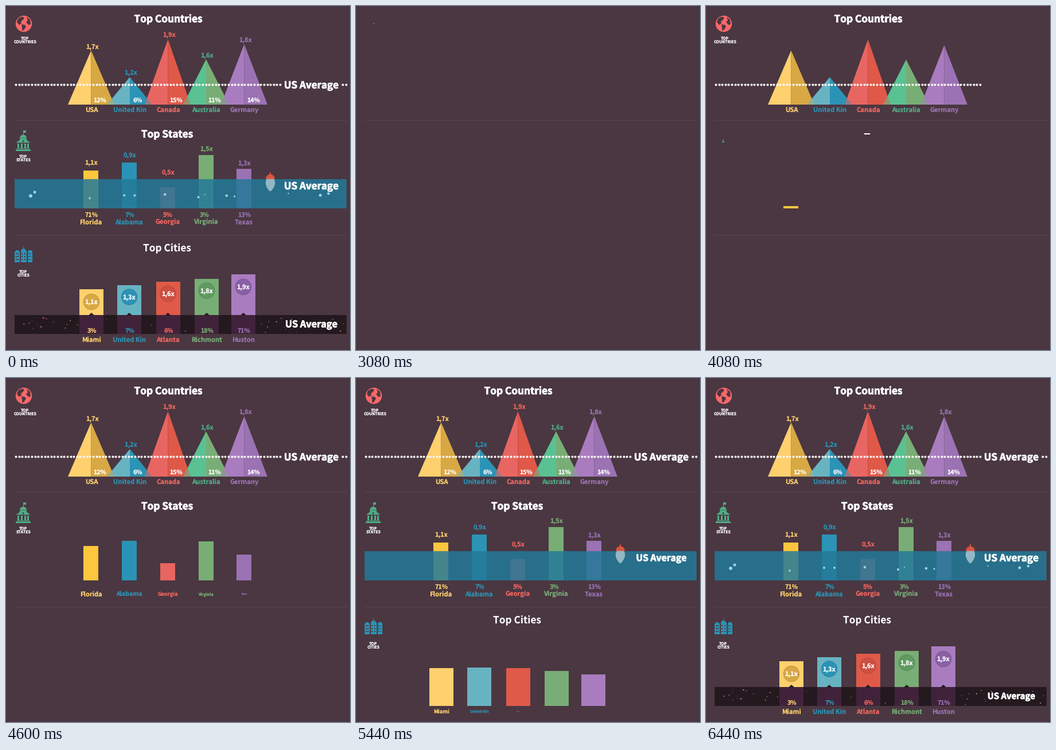
These frames come from a looping animation (600 px wide and 600 px high, 6480 ms). A matplotlib script:

```python
import numpy as np
import matplotlib.pyplot as plt
from matplotlib.animation import FuncAnimation
from matplotlib.patches import Circle, Polygon, Rectangle, Wedge
from matplotlib.patheffects import withStroke
from matplotlib.transforms import Affine2D

STEP, FRAMES = 40, 162
END = STEP * FRAMES
FADE_STEPS = 11
PX = 0.72  # points per pixel at 100 dpi

BG = "#4a3741"
YELLOW, BLUE, RED, GREEN, PURPLE = "#ffd06e", "#2b93b5", "#f5655f", "#79ad76", "#9b72b3"
CORAL, MINT = "#fa6769", "#4fae87"

plt.rcParams["font.family"] = ["Noto Sans CJK JP", "DejaVu Sans"]
plt.rcParams["text.hinting"] = "none"

fig = plt.figure(figsize=(6, 6), dpi=100, facecolor=BG)
ax = fig.add_axes([0, 0, 1, 1])
ax.set_xlim(0, 600)
ax.set_ylim(600, 0)
ax.axis("off")

shapes, labels = [], []


def ease(t, start, dur):
    """Cubic ease-out progress, 0 to 1."""
    p = min(max((t - start) / dur, 0), 1)
    return 1 - (1 - p) ** 3


def add(patch, z=1):
    patch.set_zorder(z)
    return ax.add_patch(patch)


def rect(x0, y0, x1, y1, color, z=1, **kw):
    return add(Rectangle((x0, y0), x1 - x0, y1 - y0, fc=color, ec="none", **kw), z)


def poly(points, color, z=1, **kw):
    return add(Polygon(points, closed=True, fc=color, ec="none", lw=0, **kw), z)


def disc(x, y, r, color, z=1, edge="none"):
    return add(Circle((x, y), r, fc=color, ec=edge, lw=0.6), z)


def pop(patches, x, y, start, dur=400):
    shapes.extend((p, x, y, start, dur, True) for p in patches)


def grow(patch, base, start):
    shapes.append((patch, 0, base, start, 1000, False))


def label(s, x, y, size, color, start, dur=200, heavy=0, fade=False, z=8):
    txt = ax.text(x, y, s, ha="center", va="baseline", color=color,
                  weight="bold", zorder=z)
    if heavy:
        txt.set_path_effects([withStroke(linewidth=heavy, foreground=color)])
    labels.append((txt, y, size, start, dur, fade))


def caption(word, x, y, start):
    label("TOP", x - 0.5, y, 6.9, "white", start)
    label(word, x, y + 6.5, 6.9, "white", start + 40)


def average(y, start, dur=240):
    label("US Average", 532.5, y, 17, "white", start, dur, heavy=0.5)


# --- Countries -----------------------------------------------------------
T1, BASE1 = 3090, 172
globe = [disc(31, 31, 14.2, CORAL)]
for land in (
    [(19, 28), (21, 22), (27, 18.5), (32, 20), (30, 24), (26, 27), (27, 30), (23, 33)],
    [(27, 32), (33, 33), (35, 36), (31, 42), (28, 43), (28, 38)],
    [(36, 19), (42, 24), (43, 32), (39, 33), (35, 28), (38, 25)],
):
    globe.append(poly(land, BG, 2))
pop(globe, 31, 31, 3070)
caption("COUNTRIES", 33.5, 56, 3370)
label("Top Countries", 283, 22, 17.2, "white", 3075, 400, heavy=0.5)

countries = [
    # name, centre, left, right, apex, light, dark, value, share, value y, share x, colour
    ("USA", 148.5, 108, 189, 77.5, YELLOW, "#d8a844", "1,7x", "12%", 71, 164, YELLOW),
    ("United Kin", 216, 176, 255, 124, "#68b3c2", BLUE, "1,2x", "6%", 115.5, 230, BLUE),
    ("Canada", 282.5, 242, 322, 58, "#e86662", "#e05848", "1,9x", "15%", 50, 296.5, RED),
    ("Australia", 349, 309, 389, 93, "#5ac193", GREEN, "1,6x", "11%", 86, 364, MINT),
    ("Germany", 415.5, 375, 456, 66.5, "#a97cbf", PURPLE, "1,8x", "14%", 59, 432, PURPLE),
]


def mix(a, b):
    rgb = [np.array([int(c[k:k + 2], 16) for k in (1, 3, 5)]) for c in (a, b)]
    return tuple((rgb[0] * 0.45 + rgb[1] * 0.55) / 255)


overlaps = []
for i, (name, c, left, right, top, light, dark, val, share, vy, sx, col) in enumerate(countries):
    start = T1 + 62 * i
    grow(poly([(left, BASE1), (c, top), (c, BASE1)], light, 1 + i / 10), BASE1, start)
    grow(poly([(c, BASE1), (c, top), (right, BASE1)], dark, 1 + i / 10), BASE1, start)
    if i:
        overlaps.append(poly([(0, 0)] * 3, mix(countries[i - 1][6], light), 2))
    label(name, c + 0.5, 181, 11.2, col, T1 + 350 + 60 * i, 250)
    label(val, c + 2, vy, 11, col, 4090 + 60 * i)
    label(share, sx, 164, 10.6, "white", 4110 + 60 * i)
average(137.5, 4200)

dot_x = np.append(np.linspace(17, 478, 83), [587, 593])
dots, = ax.plot([], [], "o", color="#fbf6f4", ms=4 * PX, mew=0, zorder=6)

# --- States --------------------------------------------------------------
T2, BASE2 = 4060, 353
house = [
    rect(29.7, 217, 30.5, 226, MINT), rect(30.5, 217, 34.5, 220.5, MINT),
    add(Wedge((30, 230.5), 6, 180, 360, fc=MINT, ec="none")),
    rect(24, 230.5, 36, 233, MINT),
    poly([(17.5, 238.5), (25, 233), (35, 233), (42.5, 238.5)], MINT),
    rect(17, 250, 43, 253, MINT), rect(19, 248, 41, 249.3, MINT),
    disc(30, 235.8, 1.5, BG, 2),
]
house += [rect(x, 239.5, x + 3, 248, MINT) for x in (20, 25.5, 31.5, 37)]
pop(house, 30, 235, T2)
caption("STATES", 31, 262, 4360)
label("Top States", 281, 223, 17.2, "white", 4065, 400, heavy=0.5)

states = [
    ("Florida", 148, 287, "#fec63d", YELLOW, "1,1x", 273, "71%"),
    ("Alabama", 215, 273, BLUE, BLUE, "0,9x", 260, "7%"),
    ("Georgia", 282, 316, "#e8665f", RED, "0,5x", 290, "5%"),
    ("Virginia", 349, 260, GREEN, GREEN, "1,5x", 249, "3%"),
    ("Texas", 415, 284, PURPLE, PURPLE, "1,3x", 274, "13%"),
]
for i, (name, c, top, fill, col, val, vy, share) in enumerate(states):
    grow(rect(c - 13, top, c + 13, BASE2, fill), BASE2, T2 + 62 * i)
    label(name, c, 376.5, 11.2, col, 4410 + 40 * i, 250)
    label(share, c + (-3 if i == 3 else 0.7), 363.5, 10.8, col, 4640 + 60 * i)
    label(val, c + 0.7, vy, 11, col, 4960 + 70 * i, 160)
average(313.5, 5300)

water = poly([(0, 0)] * 3, "#237a99", 3, alpha=0.85)
u = np.linspace(0, 1, 15)
half = 8.2 * np.sin(np.pi * u ** 0.75) ** 0.7
body_y = 298 + 25.5 * u
cap_arc = np.linspace(np.pi, 2 * np.pi, 15)
cap = [(461 + 8 * np.cos(a), 301.5 + 8 * np.sin(a)) for a in cap_arc]
bobber = [
    poly(list(zip(461 + half, body_y)) + list(zip(461 - half[::-1], body_y[::-1])), "white", 4),
    poly(cap, "#d9553f", 4.1),
    rect(460.4, 289.5, 461.6, 294, "#d9553f", 4.1),
]

# x and y early on, x and y at the end, radius
bubbles = np.array([
    (44, 340, 43, 332, 3), (49, 340, 50, 326, 2.5), (146, 343, 146, 336, 1.8),
    (203, 339, 206, 331, 2), (219, 338, 224, 331, 2), (275, 344, 277, 330, 2.2),
    (328, 340, 335, 334, 2), (339, 341, 346, 330, 1), (375, 345, 384, 332, 2.2),
    (392, 344, 398, 333, 1.6), (486, 338, 492, 328, 1.2), (534, 341, 547, 331, 2.5),
    (557, 337, 562, 328, 2.2),
])
foam = ax.scatter(bubbles[:, 0], bubbles[:, 1], s=(2 * PX * bubbles[:, 4]) ** 2,
                  c="#9fd3e6", lw=0, zorder=5)

# --- Cities --------------------------------------------------------------
T3, BASE3 = 4970, 572
towers = [
    poly([(30.5, 417), (31.2, 424), (29.8, 424)], BLUE),
    poly([(25.5, 427), (28, 423.5), (33, 423.5), (35.5, 427)], BLUE),
    rect(25.5, 427, 35.5, 447, BLUE),
    rect(15, 428, 23.5, 447, BLUE), rect(37.5, 428, 46, 447, BLUE),
    rect(16.5, 426, 22, 428, BLUE), rect(39, 426, 44.5, 428, BLUE),
]
towers += [rect(x, y, x + 1.8, y + 2.6, BG, 2)
           for x in (17, 20.2, 27.3, 31.8, 39.2, 42.5) for y in (430.5, 435.5, 440.5)]
pop(towers, 30.5, 433, 4840)
caption("CITIES", 30.5, 463, 5140)
label("Top Cities", 281, 421.5, 17.2, "white", 5060, 400)

cities = [
    ("Miami", 149, 494, YELLOW, "#d8a844", YELLOW, "1,1x", 516, "3%"),
    ("United Kin", 215, 487, "#68b3c2", BLUE, BLUE, "1,3x", 507.5, "7%"),
    ("Atlanta", 282.5, 481, "#e05a48", "#cd5042", RED, "1,6x", 502, "6%"),
    ("Richmont", 350, 476, GREEN, "#5f9a60", GREEN, "1,8x", 496.5, "18%"),
    ("Huston", 414, 468, "#a97cbf", "#8a5fa5", PURPLE, "1,9x", 490, "71%"),
]
shade = []
for i, (name, c, top, fill, badge, col, val, vy, share) in enumerate(cities):
    grow(rect(c - 21, top, c + 21, BASE3, fill), BASE3, T3 + 62 * i)
    start = 5570 + 140 * i
    edge = tuple(0.88 * int(badge[k:k + 2], 16) / 255 for k in (1, 3, 5))
    pop([disc(c, vy, 13.8, badge, 2, edge)], c, vy, start, 160)
    label(val, c, vy, 11, "white", start + 150, 140)
    label(name, c, 581.5, 11.2, col, 5330 + 50 * i, 250)
    label(share, c + 1, 565.5, 10.6, col, 5880, 240, fade=True)
    shade.append(rect(c - 21, 539, c + 21, BASE3, "#40233a", 4))
average(554.5, 6308, 264)

rng = np.random.default_rng(8)
band = [rect(15, 539, 594, BASE3, "#24191f", 3)]
band += [poly([(c[1] - 5, 539.5), (c[1], 535), (c[1] + 5, 539.5)], "#24191f", 4.2)
         for c in cities]
specks_x = np.concatenate([rng.uniform(20, 126, 18), rng.uniform(172, 390, 8),
                           rng.uniform(438, 590, 24)])
specks_y = rng.uniform(542, 570, specks_x.size)
tints = rng.choice(["#d0605f", "#c9a25a", "#8d5a72", "#b9a0a8"], specks_x.size)
band += [disc(x, y, r, tint, 3.5) for x, y, r, tint in
         zip(specks_x, specks_y, rng.uniform(0.5, 1.0, specks_x.size), tints)]

# --- Dividers and closing fade -------------------------------------------
rules = [(rect(14, y, 596, y + 1, "#57444d", 0.5), start)
         for y, start in ((199, 3080), (399, 4040))]
veil = rect(0, 0, 600, 600, BG, 20)


def place(patch, x, y, sx, sy, dy=0):
    move = Affine2D().translate(-x, -y).scale(sx, sy).translate(x, y + dy)
    patch.set_transform(move + ax.transData)


def update_countries(t):
    for i, lens in enumerate(overlaps):
        (_, c1, _, r1, top1, *_), (_, c2, l2, _, top2, *_) = countries[i:i + 2]
        h1 = (BASE1 - top1) * ease(t, T1 + 62 * i, 1000)
        h2 = (BASE1 - top2) * ease(t, T1 + 62 * (i + 1), 1000)
        lens.set_visible(h2 > 0)
        if h2 > 0:
            a, b = h1 / (r1 - c1), h2 / (c2 - l2)
            x = (a * r1 + b * l2) / (a + b)
            lens.set_xy([(l2, BASE1), (x, BASE1 - b * (x - l2)), (r1, BASE1)])
    reach = 17 + 463 * (t - 3700) / 340 if t < 4440 else 600
    if t < 4440:
        reach = min(reach, 480)
    xs = dot_x[dot_x <= reach] if t >= 3700 else dot_x[:0]
    dots.set_data(xs, np.full(xs.size, 137))


def update_water(t):
    p = ease(t, 4890, 480)
    water.set_visible(p > 0)
    calm = 1 - min(max((t - 4890) / 480, 0), 1)
    x = np.linspace(15, 594 + 4 * calm, 90)
    top = BASE2 - 51 * p - 3.6 * calm * np.sin((x - 125) * 2 * np.pi / 118 + (t - 5040) / 90)
    top = np.minimum(top, BASE2)
    water.set_xy(np.vstack([np.column_stack([x, top]), [(594, BASE2), (15, BASE2)]]))

    drop = -310 * (1 - ease(t, 4900, 480))
    for part in bobber:
        part.set_visible(t >= 4900)
        place(part, 0, 0, 1, 1, drop)
    bobber[0].set_alpha(0.5 + 0.5 * min(max(-drop / 30, 0), 1))

    k = (t - 6000) / 440
    foam.set_offsets(bubbles[:, :2] + (bubbles[:, 2:4] - bubbles[:, :2]) * k)
    foam.set_alpha(min(max((t - 5640) / 160, 0), 1))


def update_band(t):
    dy = 68 * (1 - ease(t, 5990, 400))
    for part in band:
        part.set_visible(t > 5990)
        place(part, 0, 0, 1, 1, dy)
    for part in shade:
        part.set_visible(dy < 33)
        part.set_y(539 + dy)
        part.set_height(max(33 - dy, 0))


def update(n):
    t = END if n < FADE_STEPS else n * STEP
    for patch, x, y, start, dur, both in shapes:
        s = ease(t, start, dur)
        patch.set_visible(s > 0)
        if s > 0:
            place(patch, x, y, s if both else 1, s)
    for txt, y, size, start, dur, fade in labels:
        s = ease(t, start, dur)
        txt.set_visible(s > 0.08)
        if fade:
            txt.set_alpha(s)
            s = 1
        if s > 0.08:
            txt.set_fontsize(size * s * PX)
            txt.set_y(y + 0.366 * size * s)
    update_countries(t)
    update_water(t)
    update_band(t)
    for rule, start in rules:
        rule.set_visible(t >= start)
    veil.set_alpha(n / FADE_STEPS if n < FADE_STEPS else 0)
    return []


anim = FuncAnimation(fig, update, frames=FRAMES, interval=STEP,
                     init_func=lambda: [], repeat=True, repeat_delay=0, blit=False)
plt.show()
```
